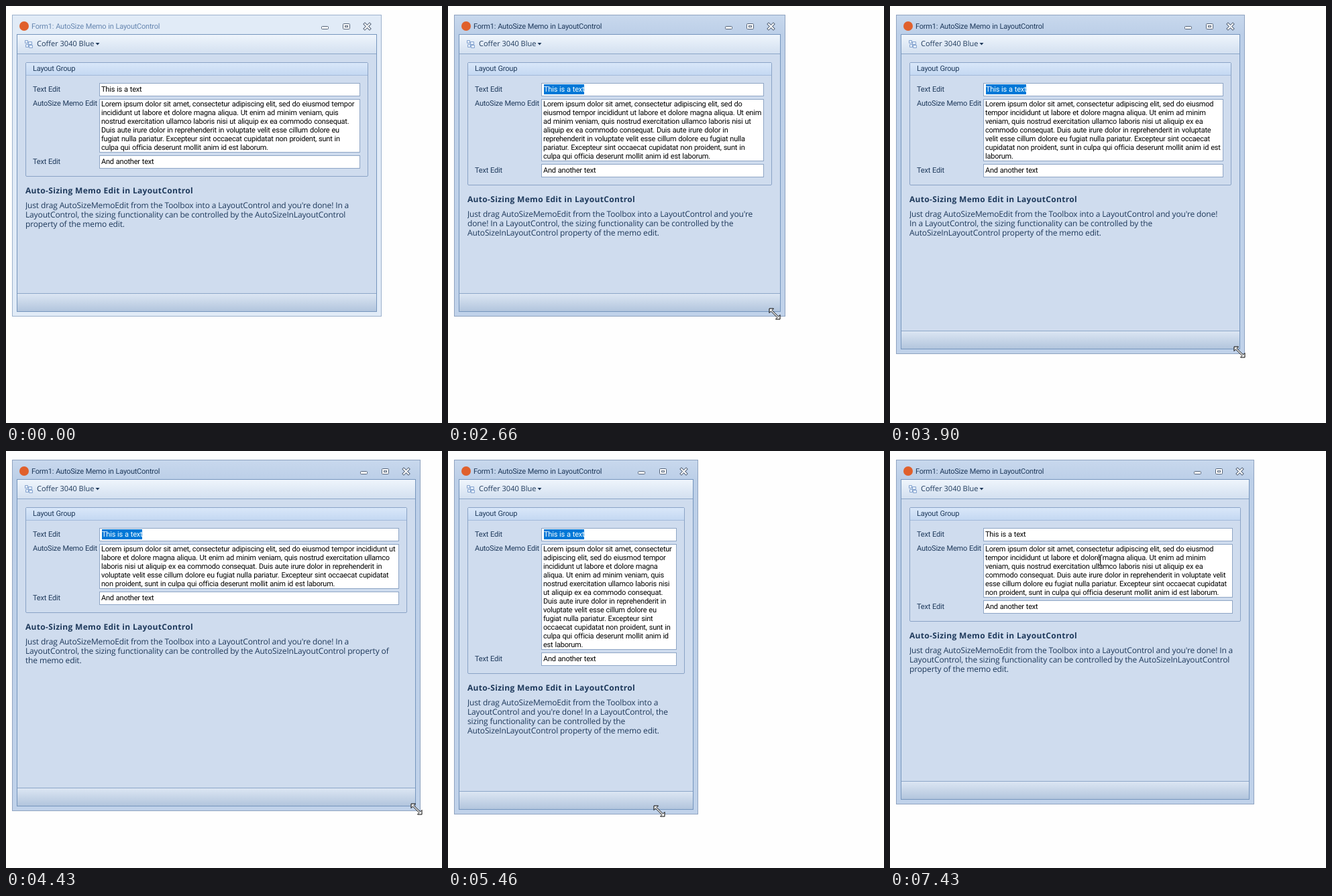
An HTML page that plays this animation: 650 px wide and 623 px high, repeating every 8 s.

```html
<!DOCTYPE html>
<html lang="en">
<head>
<meta charset="utf-8">
<title>Auto-sizing memo</title>
<style>
  * { box-sizing: border-box; }
  html, body { margin: 0; width: 100%; height: 100%; overflow: hidden; background: #fefefe; }
  body {
    position: relative; color: #1e395b; white-space: nowrap;
    font: 11px/16px Roboto, "Liberation Sans", sans-serif;
    letter-spacing: -.22px; word-spacing: .5px; text-rendering: geometricPrecision;
  }
  #win, #win > *, #client > *, #cursor { position: absolute; }
  #win {
    left: 9px; top: 13px; border: 1px solid #8fa3c0;
    background: linear-gradient(#c8d8ed, #bccfe8 28px, #c0d2ea);
  }
  #win.idle { background: #e1ebf7; border-color: #9db2cd; }
  #logo { left: 10px; top: 9px; width: 14px; height: 14px; border-radius: 50%; background: #e0602c; }
  #caption { left: 28px; right: 101px; top: 9px; overflow: hidden; text-overflow: ellipsis; }
  .idle #caption { color: #6686b0; }
  #buttons { right: 11px; top: 9px; fill: #fff; stroke: #56657a; }
  #client { inset: 28px 6px 6px; border: 1px solid #7595bd; background: #cfdcee; overflow: hidden; }
  #bar {
    left: 0; right: 0; top: 0; height: 29px; padding-left: 29px;
    background: linear-gradient(#eff5fc, #d3e0f0); border-bottom: 1px solid #8ca6c8;
    font: 11px/27px "Open Sans", "Noto Sans", sans-serif; letter-spacing: 0; word-spacing: 0;
  }
  #bar svg { position: absolute; left: 11px; top: 8px; fill: #e3edfa; stroke: #86a4cf; }
  #status {
    left: 0; right: 0; bottom: 0; height: 27px;
    border-top: 1px solid #8ca6c8; background: linear-gradient(#dce6f3, #b2c5dd);
  }
  #content { inset: 41px 12px 38px; overflow: hidden; }
  #group { border: 1px solid #8aa3c6; border-radius: 2px; }
  #head {
    height: 19px; line-height: 18px; padding-left: 10px;
    background: linear-gradient(#d9e7f9, #c4d8f2); border-bottom: 1px solid #a3bada;
  }
  #form {
    display: grid; grid-template-columns: 99px minmax(0, 1fr);
    row-gap: 4px; padding: 11px 11px 11px 10px; line-height: 20px;
  }
  .field {
    height: 20px; padding: 0 2px; line-height: 18px; overflow: hidden;
    color: #000; background: #fff; border: 1px solid #8ea5c5;
  }
  #memo { height: auto; line-height: 13px; }
  #memo, #about { white-space: pre; }
  .selected { margin-left: 1px; padding: 1px 0; color: #fff; background: #0078d7; }
  #heading, #about { font: 12px/14px "Open Sans", "Noto Sans", sans-serif; word-spacing: 0; }
  #heading { margin: 13px 0 7px; line-height: 16px; font-weight: 700; letter-spacing: .32px; }
  #about { letter-spacing: -.14px; }
  #cursor { left: 0; top: 0; overflow: visible; fill: #fff; stroke: #000; }
</style>
</head>
<body>
<div id="win">
  <div id="logo"></div>
  <div id="caption">Form1: AutoSize Memo in LayoutControl</div>
  <svg id="buttons" width="80" height="14">
    <rect x="2.5" y="7.5" width="10" height="4" rx="1"/>
    <rect x="34.5" y="3.5" width="10" height="8" rx="1"/>
    <rect x="37.5" y="6.5" width="4" height="2"/>
    <path d="M67 4l7 7m0-7l-7 7" stroke-width="4" stroke-linecap="square"/>
    <path d="M67 4l7 7m0-7l-7 7" stroke="#fff" stroke-width="2" stroke-linecap="square"/>
  </svg>
  <div id="client">
    <div id="bar">
      <svg width="120" height="14">
        <path d="M.5 .5h4v4h-4zM5.500 2.500h5v4h-5zM1.500 6.500h4v4h-4zM6.500 7.500h5v4h-5z"/>
        <path d="M105.500 4h6l-3 3.500z" fill="#1e395b" stroke="none"/>
      </svg>
      Coffer 3040 Blue
    </div>
    <div id="content">
      <div id="group">
        <div id="head">Layout Group</div>
        <div id="form">
          <div>Text Edit</div>
          <div class="field"><span id="first">This is a text</span></div>
          <div style="line-height:14px">AutoSize Memo Edit</div>
          <div class="field" id="memo"></div>
          <div>Text Edit</div>
          <div class="field">And another text</div>
        </div>
      </div>
      <div id="heading">Auto-Sizing Memo Edit in LayoutControl</div>
      <div id="about"></div>
    </div>
    <div id="status"></div>
  </div>
</div>
<svg id="cursor" width="1" height="1"><path id="shape"/></svg>
<script>
const $ = id => document.getElementById(id);
const LOOP = 8000;

const LOREM = 'Lorem ipsum dolor sit amet, consectetur adipiscing elit, sed do eiusmod tempor ' +
  'incididunt ut labore et dolore magna aliqua. Ut enim ad minim veniam, quis nostrud exercitation ' +
  'ullamco laboris nisi ut aliquip ex ea commodo consequat. Duis aute irure dolor in reprehenderit ' +
  'in voluptate velit esse cillum dolore eu fugiat nulla pariatur. Excepteur sint occaecat cupidatat ' +
  'non proident, sunt in culpa qui officia deserunt mollit anim id est laborum.';
const ABOUT = "Just drag AutoSizeMemoEdit from the Toolbox into a LayoutControl and you're done! In a " +
  'LayoutControl, the sizing functionality can be controlled by the AutoSizeInLayoutControl ' +
  'property of the memo edit.';

const SHAPES = {
  arrow: 'M.5 .5V16.500L4.500 13L7 18.500L9 17.500L6.500 12H11.500Z',
  resize: 'M-8-8H-1.500L-4-5.500L5.500 4L8 1.500V8H1.500L4 5.500L-5.500-4L-8-1.500Z',
  beam: 'M-2.500-7.500h2l1 1 1-1h2M.5-6.500V6.500M-2.500 7.500h2l1-1 1 1h2'
};

// [time, right, bottom] of the window
const EDGE = [
  [2400, 560, 464], [3130, 364, 464], [3330, 364, 464], [3400, 378, 470], [4130, 583, 533],
  [4430, 618, 538], [4960, 622, 602], [5000, 622, 602], [5460, 373, 543], [5830, 255, 536],
  [6100, 255, 536], [6360, 326, 525], [6830, 541, 520], [6960, 541, 520], [7050, 543, 528]
];
// [time, x, y] of the pointer, which runs ahead of the edge
const POINTER = [
  [760, 636, 540], [1130, 560, 461], [1360, 560, 461], [1500, 551, 460], [2400, 551, 460],
  [3080, 356, 461], [3330, 356, 461], [3400, 370, 468], [4130, 576, 530], [4430, 612, 535],
  [4940, 616, 599], [5000, 614, 598], [5460, 315, 538], [5780, 247, 533], [6100, 247, 533],
  [6360, 414, 514], [6720, 534, 517], [6960, 534, 517], [7020, 536, 526], [7430, 313, 163]
];

// Monotone cubic through the keys, at rest wherever the direction turns
function glide(keys, t, n) {
  const next = keys.findIndex(k => k[0] > t);
  if (next < 0) return keys[keys.length - 1][n];
  if (next === 0) return keys[0][n];
  const secant = i => keys[i] && keys[i + 1]
    ? (keys[i + 1][n] - keys[i][n]) / (keys[i + 1][0] - keys[i][0]) : 0;
  const slope = i => {
    const a = secant(i - 1), b = secant(i);
    return a * b > 0 ? 2 * a * b / (a + b) : 0;
  };
  const a = keys[next - 1], b = keys[next], span = b[0] - a[0], u = (t - a[0]) / span;
  const ease = u * u * (3 - 2 * u);
  return a[n] + (b[n] - a[n]) * ease +
    span * u * (1 - u) * (slope(next - 1) * (1 - u) - slope(next) * u);
}

// Approximate glyph advances, used only to choose line breaks
const ADVANCES = [["il'", 2], [' j', 3], ['frt,.!I', 4], ['cskvxyzLJ', 5], ['UDAC', 7], ['mwM', 8]];
const advance = c => (ADVANCES.find(([set]) => set.includes(c)) || [0, 6])[1];
const measure = text => [...text].reduce((sum, c) => sum + advance(c), 0);

function wrap(text, limit) {
  const lines = [];
  for (const word of text.split(' ')) {
    const joined = lines.length ? lines[lines.length - 1] + ' ' + word : word;
    if (lines.length && measure(joined) <= limit) lines[lines.length - 1] = joined;
    else lines.push(word);
  }
  return lines.join('\n');
}

function setText(id, text) {
  if ($(id).textContent !== text) $(id).textContent = text;
}

function draw() {
  const t = performance.now() % LOOP;
  const [right, bottom] = [1, 2].map(n => Math.round(glide(EDGE, t, n)));
  const [x, y] = [1, 2].map(n => Math.round(glide(POINTER, t, n)));

  $('win').style.width = right - 9 + 'px';
  $('win').style.height = bottom - 13 + 'px';
  $('win').className = t < 1860 ? 'idle' : '';
  $('first').className = t >= 1890 && t < 7400 ? 'selected' : '';
  setText('memo', wrap(LOREM, right - 177));
  setText('about', wrap(ABOUT, (right - 49) / 1.158));

  const shape = t < 1400 ? 'arrow' : t < 7060 ? 'resize' : y > 219 ? 'arrow' : 'beam';
  $('cursor').style.display = t < 760 ? 'none' : '';
  $('shape').setAttribute('d', SHAPES[shape]);
  $('shape').setAttribute('fill', shape === 'beam' ? 'none' : '#fff');
  $('shape').setAttribute('transform', `translate(${x} ${y})`);
  requestAnimationFrame(draw);
}
draw();
</script>
</body>
</html>
```
